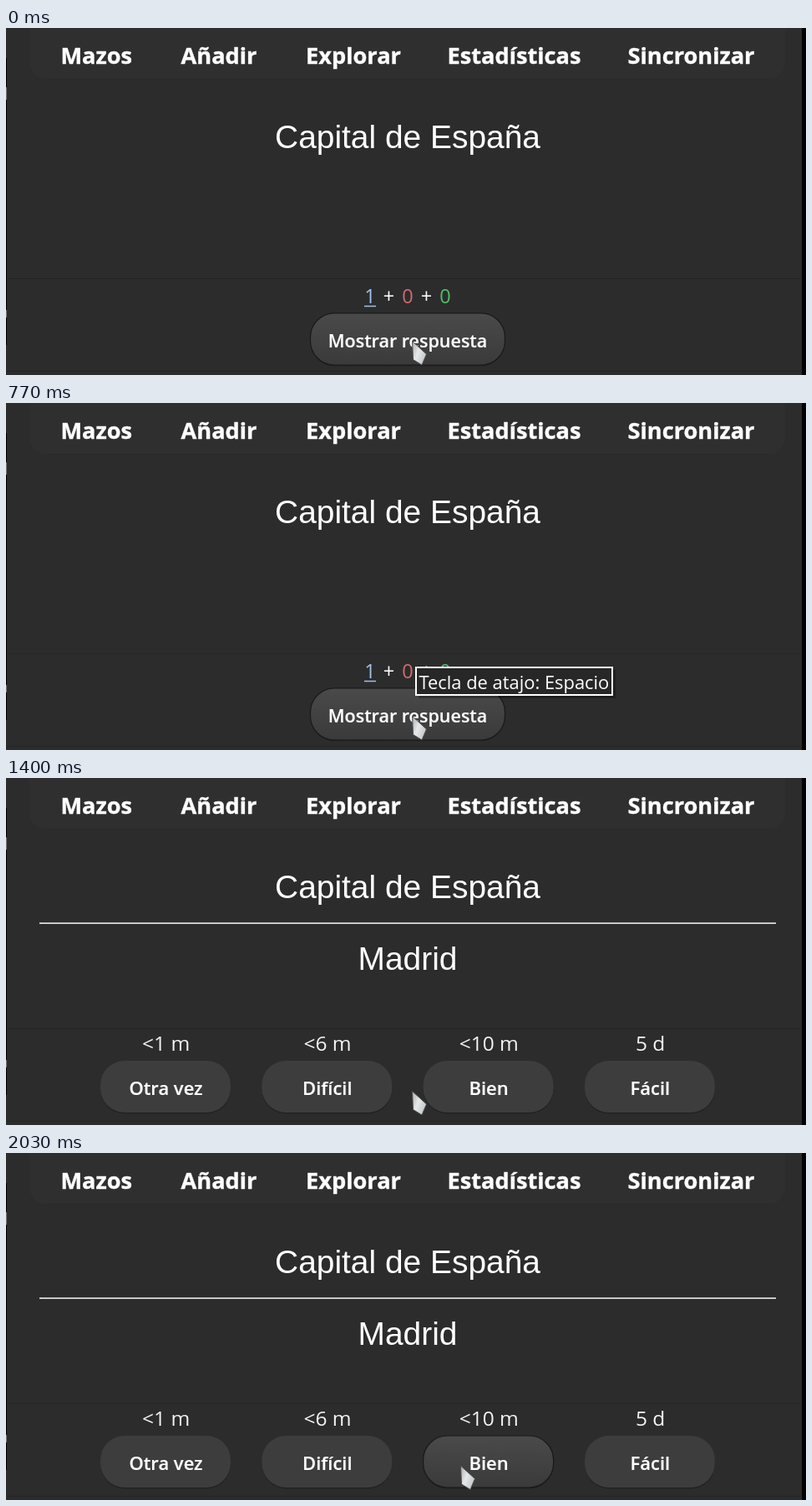
An HTML page that plays this animation: 958 by 416 pixels, repeating every 2.66 s.

```html
<!DOCTYPE html>
<html lang="es">
<head>
<meta charset="utf-8">
<style>
html, body { margin: 0; width: 100%; height: 100%; overflow: hidden; background: #2c2c2c; }
svg { display: block; width: 958px; height: 416px; }
text { font-family: "Open Sans", "Noto Sans", sans-serif; fill: #fff; text-anchor: middle; }
.nav { font-size: 27.2px; font-weight: 700; stroke: #fff; stroke-width: .4; }
.card { font: 38.9px "Liberation Sans", Arial, sans-serif; }
.count { font-size: 23.5px; }
.due { font-size: 24.5px; fill: #f4f4f4; }
.label { font-size: 22px; font-weight: 600; stroke: #fff; stroke-width: .2; }
.tip { font-size: 21.9px; text-anchor: start; }
.flat { fill: #3d3d3d; }
.hover { fill: url(#lit); stroke: #191919; stroke-width: 1.2; }
.pressed { fill: url(#lit); }
</style>
</head>
<body>
<svg viewBox="0 0 958 416">
  <defs>
    <linearGradient id="lit" x2="0" y2="1">
      <stop stop-color="#4a4a4a"/><stop offset="1" stop-color="#3a3a3a"/>
    </linearGradient>
    <linearGradient id="steel" x2="1" y2=".6">
      <stop stop-color="#a9adb0"/><stop offset=".5" stop-color="#e6e9ea"/><stop offset="1" stop-color="#c3c7c9"/>
    </linearGradient>
    <clipPath id="tipClip"><rect x="480" y="316" width="260" height="44"/></clipPath>
  </defs>

  <rect width="958" height="416" fill="#2c2c2c"/>
  <path d="M28 0H933V41a20 20 0 0 1-20 20H48a20 20 0 0 1-20-20Z" fill="#2f2f2f"/>
  <path d="M48 61.5H913" stroke="#292929"/>
  <path d="M0 300.5H952M0 411.5H952" stroke="#252525"/>
  <rect x="953" width="5" height="416" fill="#000"/>
  <path d="M.5 36V380" stroke="#000"/>
  <path d="M.5 71V86M.5 338V347" stroke="#777"/>
  <g id="nav"></g>
  <text class="card" x="481" y="144">Capital de España</text>

  <g id="answer">
    <rect x="40" y="173.3" width="882" height="1.6" fill="#f0f0f0"/>
    <text class="card" x="481" y="229.5">Madrid</text>
  </g>

  <g id="ask">
    <g id="counts"></g>
    <path d="M429 333.5H443" stroke="#9fc3ea" stroke-width="1.5"/>
    <rect x="365" y="343.5" width="232" height="62" rx="29" fill="#222" opacity=".6"/>
    <rect id="show" x="364.5" y="341.8" width="233" height="62.4" rx="29"/>
    <text class="label" style="font-size:21.5px" x="481" y="383">Mostrar respuesta</text>
  </g>

  <g id="grades"></g>

  <g clip-path="url(#tipClip)">
    <g id="tip">
      <rect x="494" y="320" width="236" height="34" fill="#000" opacity=".3"/>
      <rect x="491" y="317" width="235" height="33" fill="#272727" stroke="#fff" stroke-width="2"/>
      <text class="tip" x="494.5" y="343">Tecla de atajo: Espacio</text>
    </g>
  </g>

  <path id="cursor" d="M0 0 17 15.5 11.5 28.5 1 22Z" fill="url(#steel)" stroke="#4a4c4e" stroke-linejoin="round"/>
</svg>
<script>
const LOOP = 2660;
const $ = id => document.getElementById(id);
const text = (cls, x, y, s, fill = "") =>
  `<text class="${cls}" x="${x}" y="${y}"${fill && ` style="fill:${fill}"`}>${s}</text>`;

$("nav").innerHTML = [["Mazos", 108.3], ["Añadir", 255], ["Explorar", 416], ["Estadísticas", 608.5], ["Sincronizar", 820.5]]
  .map(([s, x]) => text("nav", x, 43, s)).join("");

$("counts").innerHTML = [["1", 436, "#9fc3ea"], ["+", 458.5], ["0", 481, "#d06c6c"], ["+", 503.5], ["0", 526, "#4fbf68"]]
  .map(([s, x, fill]) => text("count", x, 330, s, fill)).join("");

$("grades").innerHTML = [["&lt;1 m", "Otra vez"], ["&lt;6 m", "Difícil"], ["&lt;10 m", "Bien"], ["5 d", "Fácil"]]
  .map(([due, label], i) => {
    const x = 191 + i * 193.3;
    return text("due", x + .7, 327, due) +
      `<rect x="${x - 78}" y="341" width="156" height="61.5" rx="29" fill="#222"/>` +
      `<rect class="flat" x="${x - 78}" y="339" width="156" height="62" rx="29"/>` +
      text("label", x + .5, 380, label);
  }).join("");
const good = $("grades").querySelectorAll(".flat")[2];

const show = (el, on) => el.style.display = on ? "" : "none";
const clamp = v => Math.min(1, Math.max(0, v));

function draw(t) {
  const graded = t >= 1400;
  show($("answer"), t >= 1370);
  show($("ask"), !graded);
  show($("grades"), graded);
  $("show").setAttribute("class", t < 1270 ? "hover" : "pressed");

  // The tooltip unrolls downwards in steps of about 35 ms.
  show($("tip"), t >= 630 && t < 1270);
  const unroll = clamp(Math.floor((t - 630) / 35) / 4);
  $("tip").setAttribute("transform", `translate(0 ${-29 * (1 - unroll)})`);

  // The pointer moves to the third button in seven steps.
  const k = clamp((Math.floor((t - 1800) / 38) + 1) / 7);
  const x = 486.5 + 58 * k * k * (3 - 2 * k);
  $("cursor").setAttribute("transform", `translate(${x} ${375.5 - k * .5})`);
  good.setAttribute("class", x >= 501 ? "hover" : "flat");
}

function tick(now) {
  draw(now % LOOP);
  requestAnimationFrame(tick);
}
draw(0);
requestAnimationFrame(tick);
</script>
</body>
</html>
```
